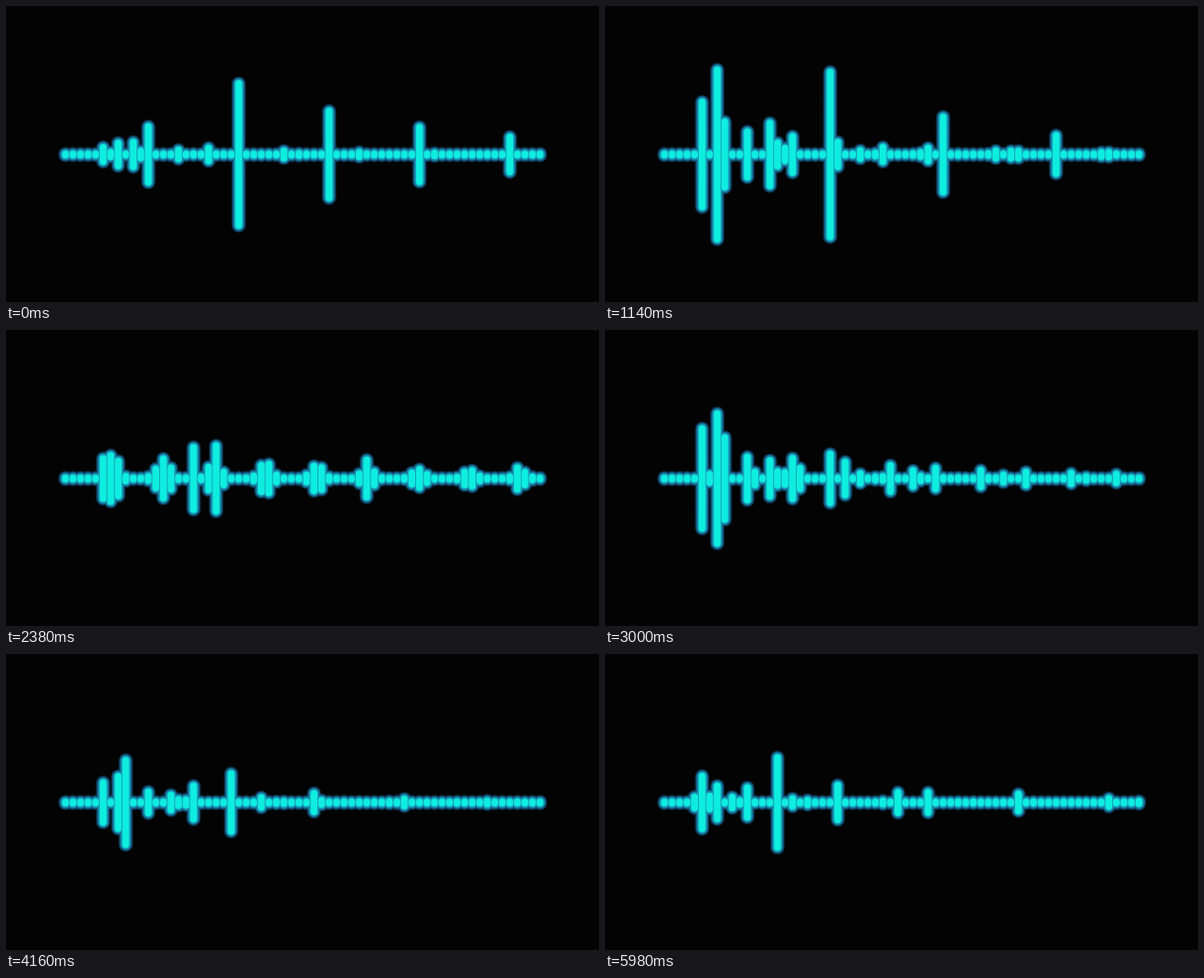
Write an HTML page that moves like this. It is 600 px wide and 300 px high and loops after 6000 ms.

```html
<!DOCTYPE html>
<html lang="en">
<head>
<meta charset="utf-8">
<title>Audio spectrum</title>
<style>
  html, body { margin: 0; width: 100%; height: 100%; overflow: hidden; background: #030303; }
  svg { display: block; width: 600px; height: 300px; }
  path { fill: none; stroke-linecap: round; }
</style>
</head>
<body>
<svg id="stage" viewBox="0 0 600 300"></svg>
<script>
const LOOP = 6000, LEFT = 60.2, STEP = 7.62, MID = 150.5, REST = .5;
const bands = Array.from({ length: 64 }, (_, i) => i);
const clamp = x => Math.min(1, Math.max(0, x));

// Soft edge to bright core: stroke width and colour
const layers = [
  [15, '#06202e'], [13.2, '#10486a'], [11.2, '#18789f'], [9, '#18a2ba'], [6.7, '#0eeedf']
].map(([width, color]) => {
  const path = document.createElementNS('http://www.w3.org/2000/svg', 'path');
  path.setAttribute('stroke', color);
  path.setAttribute('stroke-width', width);
  document.getElementById('stage').append(path);
  return path;
});

// A tone is a row of partials, measured in bands. They weaken by `fall`
// after the strongest one, and twice as fast before it.
function tone(pitch, level, fall, { peak = 1, step = pitch, spread = 0 } = {}) {
  const bars = bands.map(() => 0);
  for (let k = 1, at = pitch; at < bands.length; k++, at += step) {
    const strength = level * fall ** (k < peak ? 2 * (peak - k) : k - peak);
    bands.forEach(i => {
      const distance = Math.abs(at - i - .5);
      bars[i] += strength * clamp((.6 + spread - distance) / (.1 + spread)) ** 2;
    });
  }
  return bars;
}

const lowChord = (a, b, c) => [tone(5.67, a, .37), tone(7.48, b, .27), tone(8.7, c, .32)];
const highChord = (a, b, c, d) => [
  tone(4.97, a, .05), tone(5.95, b, .37), tone(7.9, c, .05), tone(9.95, d, .35)
];

const phrase = (start, end, ...tones) => ({
  start, end, bars: bands.map(i => tones.reduce((sum, bars) => sum + bars[i], 0))
});

const score = [
  phrase(-400, 300, tone(11.9, 148, .62, { peak: 2 }), tone(9.95, 25, .5), tone(7.9, 23, .35),
    tone(5.95, 14, .1)),
  phrase(40, 960, ...lowChord(85, 110, 70)),
  phrase(1020, 2200, ...lowChord(71, 115, 44), tone(14.96, 11, .6),
    tone(22.45, 100, .5, { step: 14.96 }), tone(11.75, 16, .5, { peak: 2 })),
  phrase(1600, 2240, ...lowChord(50, 65, 40)),
  phrase(2300, 2400, tone(6.77, 28, .85, { spread: 1.6 }), tone(20.3, 20, .5),
    tone(17.2, 38, .02), tone(5.67, 16, .1)),
  phrase(2400, 3300, tone(6.05, 42, .78, { peak: 4 })),
  phrase(2400, 4580, ...lowChord(128, 170, 107), tone(11.27, 44, .42, { peak: 2 })),
  phrase(4000, 4580, tone(8.7, 38, .32), tone(11.27, 28, .3, { peak: 2 })),
  phrase(4720, LOOP, ...highChord(22, 106, 72, 20), tone(11.9, 70, .6, { peak: 2 }),
    tone(15.8, 42, .1)),
  phrase(5820, LOOP, tone(15.8, 51, .25))
];

// Quick attack, bright ring that dies soon, long tail, short release
function loudness({ start, end }, time) {
  const age = time - start;
  if (age <= 0) return 0;
  const ring = Math.exp(-age / 1300) * (1 + .7 * Math.exp(-age / 200)) / 1.7;
  return clamp(age / 80) * ring * clamp(1 - (time - end) / 120);
}

function draw(time) {
  const volumes = score.map(part => loudness(part, time));
  const d = bands.map(i => {
    const half = score.reduce((sum, part, n) => sum + part.bars[i] * volumes[n], REST);
    return `M${(LEFT + i * STEP).toFixed(2)} ${(MID - half).toFixed(2)}v${(half * 2).toFixed(2)}`;
  }).join('');
  layers.forEach(path => path.setAttribute('d', d));
}

const origin = performance.now();
function tick() {
  draw((performance.now() - origin) % LOOP);
  requestAnimationFrame(tick);
}
tick();
</script>
</body>
</html>
```
